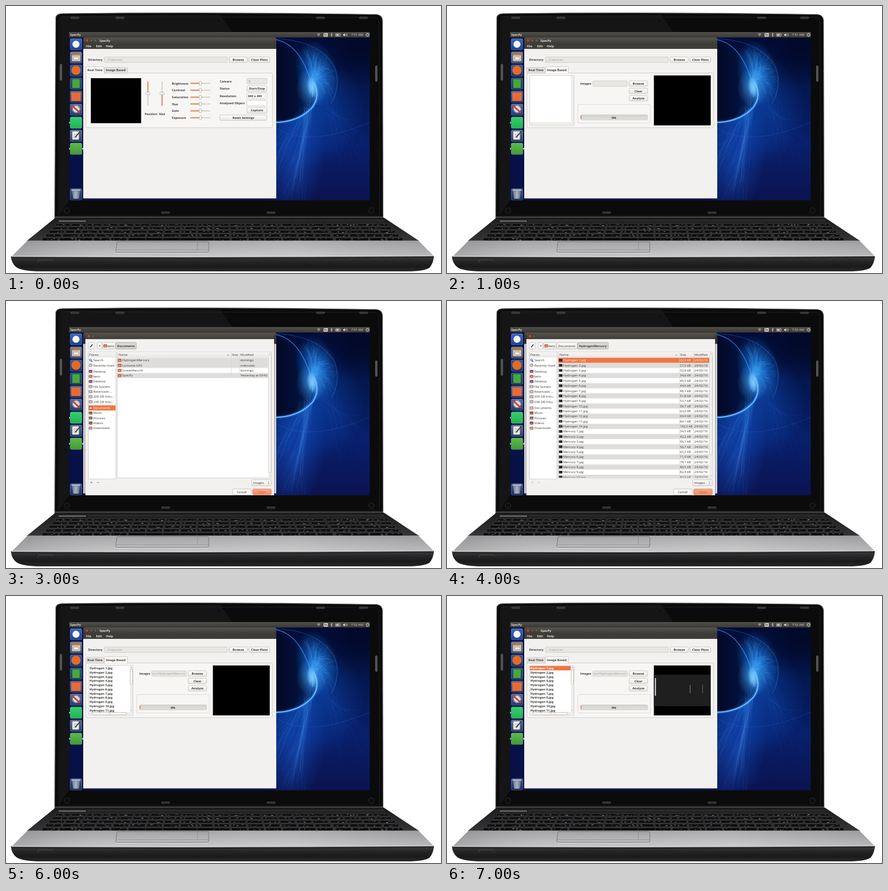
These frames come from a looping animation (800 by 492 pixels, 8 s). An HTML page with a canvas:

```html
<!DOCTYPE html>
<html lang="en">
<head>
<meta charset="utf-8">
<title>Spectrum analysis demo</title>
<style>
html, body { margin: 0; width: 100%; height: 100%; overflow: hidden; background: #fff; }
canvas { display: block; width: 800px; height: 492px; }
</style>
</head>
<body>
<canvas id="stage" width="800" height="492"></canvas>
<script>
const stage = document.getElementById('stage');
let c = stage.getContext('2d');
const ORANGE = '#ee7643', BODY = '#f2f1f0', INK = '#3c3b38', LINE = '#c9c5c0', DIM = '#a3a09b';

let seed = 7;
const rnd = (a = 0, b = 1) => {
  seed = (seed * 16807) % 2147483647;
  return a + (b - a) * seed / 2147483647;
};

// ---------- drawing helpers ----------
function rect(x, y, w, h, fill) { c.fillStyle = fill; c.fillRect(x, y, w, h); }
function box(x, y, w, h, fill, stroke, r = 1.5) {
  c.beginPath();
  c.roundRect(x, y, w, h, r);
  if (fill) { c.fillStyle = fill; c.fill(); }
  if (stroke) { c.strokeStyle = stroke; c.lineWidth = 0.8; c.stroke(); }
}
function dot(x, y, r, fill, stroke) {
  c.beginPath();
  c.arc(x, y, r, 0, 7);
  if (fill) { c.fillStyle = fill; c.fill(); }
  if (stroke) { c.strokeStyle = stroke; c.lineWidth = 0.9; c.stroke(); }
}
function poly(points, fill) {
  c.beginPath();
  points.forEach(([x, y]) => c.lineTo(x, y));
  c.closePath();
  c.fillStyle = fill;
  c.fill();
}
function stroke(d, color, width = 1) {
  c.strokeStyle = color;
  c.lineWidth = width;
  c.stroke(new Path2D(d));
}
function shade(x0, y0, x1, y1, ...colors) {
  const g = c.createLinearGradient(x0, y0, x1, y1);
  colors.forEach((k, i) => g.addColorStop(i / (colors.length - 1), k));
  return g;
}
function glow(x, y, r, color, sx = 1, angle = 0) {
  c.save();
  c.translate(x, y);
  c.rotate(angle);
  c.scale(sx, 1);
  const g = c.createRadialGradient(0, 0, 0, 0, 0, r);
  g.addColorStop(0, `rgba(${color})`);
  g.addColorStop(1, `rgba(${color.replace(/[^,]+$/, '0')})`);
  dot(0, 0, r, g);
  c.restore();
}
function text(s, x, y, color = INK, bold = false, align = 'left') {
  c.font = bold ? 'bold 5.7px "Open Sans", sans-serif' : '5.9px "Open Sans", sans-serif';
  c.textAlign = align;
  c.fillStyle = color;
  c.fillText(s, x, y + 2.1);
}
const label = (s, x, y, color) => text(s, x, y, color, true);
function clipped(x, y, w, h, draw) {
  c.save();
  c.beginPath();
  c.rect(x, y, w, h);
  c.clip();
  draw();
  c.restore();
}
function button(s, x, y, w, h = 10.5) {
  box(x, y, w, h, shade(0, y, 0, y + h, '#fdfdfc', '#e9e7e5'), '#bfbab4', 2);
  text(s, x + w / 2, y + h / 2, INK, true, 'center');
}
function arrow(x, y, up, color = '#5a5855', r = 1.5) {
  const d = up ? -r : r;
  poly([[x - r, y - d / 2], [x + r, y - d / 2], [x, y + d / 2]], color);
}
function titleBar(x, y, w, h) {
  c.beginPath();
  c.roundRect(x, y, w, h, [3, 3, 0, 0]);
  c.fillStyle = shade(0, y, 0, y + 11, '#56544d', '#3d3c37');
  c.fill();
}
function closeButton(x, y) {
  dot(x, y, 2.9, '#e2552f', '#2e2c29');
  stroke(`M${x - 1} ${y - 1}l2 2m0-2l-2 2`, '#4a1c10', 0.7);
}

// ---------- laptop and desktop ----------
function lid() {
  const p = 'M89.5 392L91.5 22Q92 14.5 102 14Q392 10.5 681 15.5Q692 16.5 692.5 27L693.5 392Z';
  c.fillStyle = '#0b0b0c';
  c.fill(new Path2D(p));
  poly([[100, 18], [394, 16], [416, 48], [116, 48], [116, 358], [98, 384]], '#151516');
  stroke(p, '#6c6c6e', 1.2);
  stroke('M97 386L98 27Q98 20 107 20L676 21Q685 21 686 30L687 386Z', '#1f1f21', 1);
  for (const x of [119, 202, 571, 650]) box(x, 20.5, 15, 2.5, '#222', '#666', 1);
  for (const x of [286, 480]) box(x, 379.5, 15, 2.5, '#1b1b1b', '#666', 1);
  box(99.5, 107, 3, 30, '#4a4a4a', '#777');
  box(679.5, 110, 3, 29, '#4a4a4a', '#777');
  dot(391, 28, 3.5, '#070707', '#252528');
  dot(391, 28, 1, '#33343c');
  for (const x of [112, 672]) dot(x, 377, 5, '#0d0d0d', '#333');
  rect(90, 388, 603, 5, shade(0, 388, 0, 393, '#555', '#1a1a1a'));
}
function base() {
  poly([[91, 390], [695, 390], [760, 433], [38, 433]], shade(0, 390, 0, 433, '#1c1c1d', '#353537'));
  rect(97, 395, 50, 2.5, '#6a6a6c');
  rect(150, 394, 545, 3, '#2a2a2c');
  for (let row = 0; row < 5; row++) {
    const y = 401 + row * 6 + row * row * 0.12, h = 4.4 + row * 0.3;
    const left = 100 - (y - 392) * 0.95, right = 694 + (y - 392) * 1.05;
    const step = (right - left) / 21;
    for (let i = 0; i < 21; i++) {
      const x = left + i * step + (i > 16 ? 2 : 0);
      const space = row === 4 && i > 4 && i < 10;
      box(x, y, space ? step : step - 3, h, '#0d0d0e', '#434345', 1);
      if (space) continue;
      for (let k = 0; k < 3; k++) {
        rect(x + rnd(3, step - 9), y + rnd(0.8, h - 1.5), rnd(1.5, 4), rnd(0.6, 1.2), `rgba(215,215,220,${rnd(0.2, 0.65)})`);
      }
    }
  }
  const lip = 'M9 461L787 461Q786 474 779 482Q770 489 738 489L64 489Q32 489 20 482Q10 475 9 461Z';
  c.fillStyle = shade(0, 461, 0, 489, '#3d3d3f', '#262627', '#1a1a1b', '#29292a');
  c.fill(new Path2D(lip));
  const rest = new Path2D('M40 432H758L787 461Q400 464 10 462Z');
  c.fillStyle = shade(0, 432, 0, 463, '#a2a2a4', '#b4b4b6', '#c6c6c8');
  c.fill(rest);
  c.fillStyle = shade(10, 0, 787, 0, 'rgba(90,90,92,.25)', 'rgba(255,255,255,0)', 'rgba(255,255,255,.12)', 'rgba(90,90,92,.1)');
  c.fill(rest);
  stroke('M40 432.5H758', '#77777a', 0.8);
  stroke('M10 461Q400 463 787 460', '#dededf', 1.2);
  stroke('M10 464Q400 467 787 463', '#1b1b1c', 1.2);
  const pad = 'M206 434H370Q373 434 373 437V450Q373 454 369 454H206Q201 454 202 450L204 436Q204 434 206 434Z';
  c.fillStyle = shade(0, 434, 0, 454, '#a4a4a7', '#bdbdbf');
  c.fill(new Path2D(pad));
  stroke(pad, '#757578');
  stroke('M203 449H373M352 434V449', '#88888b', 0.8);
  stroke('M203 455.5H371', '#e3e3e4', 1);
  stroke('M58 473L60 468H85L88 471', '#49494b');
}
function wallpaper() {
  rect(116, 48, 553, 310, shade(0, 48, 0, 358, '#020a32', '#04174f', '#081f6b', '#0b1350'));
  glow(550, 190, 110, '15,90,210,0.6');
  glow(528, 285, 105, '20,85,205,0.5', 0.55, 0.15);
  glow(650, 80, 70, '1,6,32,0.7');

  // dark disc inside the swirl
  const disc = 'M480 64Q540 76 562 142Q572 150 570 168Q548 216 480 214Z';
  c.fillStyle = shade(497, 0, 572, 0, '#020927', '#031038', '#073079');
  c.fill(new Path2D(disc));
  glow(572, 124, 62, '25,125,235,0.8', 0.62, -0.25);
  for (let i = 0; i < 130; i++) {
    const a = rnd(-1.9, 0.6), r = rnd(35, 68);
    stroke(`M${rnd(556, 566)} ${rnd(135, 170)}Q${rnd(552, 585)} ${rnd(85, 140)} ${562 + Math.cos(a) * r * 0.72} ${142 + Math.sin(a) * r}`,
      `rgba(90,190,255,${rnd(0.04, 0.22)})`, 0.7);
  }
  for (let i = 0; i < 90; i++) {
    stroke(`M${rnd(548, 566)} ${rnd(165, 200)}Q${rnd(535, 560)} 265 ${rnd(508, 552)} ${rnd(300, 358)}`,
      `rgba(90,170,255,${rnd(0.02, 0.11)})`, 0.8);
  }
  for (let i = 0; i < 45; i++) {
    stroke(`M${rnd(560, 606)} ${rnd(155, 190)}Q${rnd(590, 640)} ${rnd(170, 230)} ${rnd(590, 669)} ${rnd(210, 300)}`,
      `rgba(50,120,235,${rnd(0.03, 0.16)})`, 0.6);
    stroke(`M497 ${rnd(240, 320)}Q${rnd(510, 540)} ${rnd(210, 270)} ${rnd(540, 560)} ${rnd(180, 210)}`,
      `rgba(80,160,255,${rnd(0.03, 0.16)})`, 0.6);
  }
  stroke('M497 226Q560 262 669 214', 'rgba(70,140,240,.25)', 0.8);
  const rim = 'M480 214Q536 218 564 186Q579 164 566 141';
  stroke(rim, 'rgba(40,140,255,.3)', 6);
  stroke(rim, 'rgba(110,200,255,.55)', 2.5);
  stroke(rim, '#b5e4ff', 0.8);
  glow(563, 150, 20, '190,238,255,0.95', 0.5, -0.2);
  glow(562, 150, 36, '80,180,255,0.6', 0.8);
  stroke('M490 61Q541 66 562 145', 'rgba(80,170,255,.6)', 1.3);
  stroke('M490 60Q575 62 604 112Q617 145 598 180', 'rgba(60,150,255,.35)', 1.2);
}
function launcher() {
  rect(116, 58, 26, 300, 'rgba(8,14,62,.72)');
  const tile = (y, top, bottom) => box(118, y - 10.5, 21.5, 21, shade(0, y - 10, 0, y + 10, top, bottom), 'rgba(255,255,255,.25)', 2.5);
  tile(70.5, '#3d68bd', '#20438e');
  dot(128.7, 70.5, 6.5, '#f4f6fa');
  tile(95, '#6b83ad', '#39517f');
  box(121, 87, 16, 15, '#d9cbb8', '#75604a');
  rect(121, 87, 16, 4, '#b67d4b');
  box(124, 94, 10, 5, '#f3eee7', '#8d8378', 1);
  tile(119, '#3a5a99', '#1c3670');
  dot(128.7, 118.5, 8.5, '#e66b22');
  tile(143, '#2c5575', '#23405a');
  rect(122, 135, 13.5, 16, '#45a83b');
  tile(167, '#426199', '#233a70');
  rect(120, 159, 17.5, 16, '#e86a36');
  tile(191, '#5b6c93', '#263b6d');
  dot(129, 190, 5.5, '#d9d9d9', '#f3f3f3');
  c.setLineDash([2, 1.5]);
  dot(129, 190, 7, null, '#e5e5e5');
  c.setLineDash([]);
  stroke('M122 184L136 197', '#d33a2e', 3);
  tile(215, '#34cf6b', '#22b353');
  tile(239, '#5f6f93', '#2d4069');
  box(122, 231, 12, 15, '#f3f2ee', '#aaa', 1);
  for (let y = 235; y < 244; y += 2.5) rect(124, y, 7, 0.7, '#999');
  stroke('M127 242L137 231', '#42444a', 2);
  tile(263, '#5cba49', '#409b36');
  for (const y of [215, 263]) poly([[116, y - 2], [118, y], [116, y + 2]], '#eee');
  poly([[142, 261], [139.5, 263], [142, 265]], '#eee');
  tile(347, '#42588d', '#1c2e5e');
  poly([[121.5, 340], [136, 340], [134, 355], [123.5, 355]], shade(121, 0, 136, 0, '#66738c', '#a9b3c0', '#5e6b84'));
  box(120.5, 338, 16.5, 2.5, '#cfd6de', '#6b7890', 1);
}
function panel() {
  const light = '#dfdbd2';
  rect(116, 48, 553, 10, shade(0, 48, 0, 58, '#514f49', '#3a3934'));
  label('SpecPy', 118, 53, light);
  poly([[571.5, 51.5], [575, 50], [578.5, 51.5], [575, 56]], '#8b8982');
  box(584, 50, 8, 6.5, light, null, 1);
  c.font = 'bold 5px "Open Sans", sans-serif';
  c.textAlign = 'center';
  c.fillStyle = '#3c3b37';
  c.fillText('En', 588, 55);
  stroke('M597 51.5l3.4 3.2l-1.7 1.6v-6.4l1.7 1.6L597 54.7', light, 0.7);
  box(606, 51, 8.5, 4.6, null, light, 0.5);
  rect(607.2, 52.2, 5, 2.2, light);
  poly([[620, 52], [621.5, 52], [623.5, 50.3], [623.5, 56], [621.5, 54.4], [620, 54.4]], light);
  stroke('M625 51.5q1.2 1.7 0 3.4M626.8 50.5q2 2.7 0 5.4', light, 0.7);
  dot(665, 53.2, 2.2, null, light);
  c.setLineDash([1.1, 1.1]);
  dot(665, 53.2, 3.2, null, light);
  c.setLineDash([]);
}

// ---------- application window ----------
function slider(x, y, from, to, vertical, fillFrom, fillTo) {
  const bar = (a, b, k) => vertical ? box(x - 1, a, 2, b - a, k, null, 1) : box(a, y - 1, b - a, 2, k, null, 1);
  bar(from, to, '#d3d0cb');
  bar(fillFrom, fillTo, '#f0804f');
  if (vertical) box(x - 4, y - 2.2, 8, 4.4, '#fafaf9', '#a9a49e', 2);
  else box(x - 2.2, y - 3.5, 4.4, 7, '#fafaf9', '#a9a49e', 2);
}
function realTime() {
  rect(156, 133, 92.5, 83, '#000');
  slider(261, 161, 139, 184, true, 139, 161);
  slider(287, 161, 139, 184, true, 161, 184);
  label('Position', 255, 199);
  label('Size', 281.5, 199);
  ['Brightness', 'Contrast', 'Saturation', 'Hue', 'Gain', 'Exposure'].forEach((s, i) => {
    const y = 142.5 + i * 12.7;
    label(s, 305, y);
    slider(357.5, y, 339, 376, false, 339, 357);
  });
  ['Camara', 'Status', 'Resolution', 'Analyzed Object'].forEach((s, i) => label(s, 393, 138.7 + i * 13.4));
  box(443, 133.5, 37, 10, '#e9e7e4', LINE);
  label('0', 446, 138.7, DIM);
  button('Start/Stop', 443, 147, 37);
  box(443, 160.5, 37, 10.5, '#fff', '#bfbab4');
  label('680 x 480', 445, 165.7);
  arrow(476.5, 164, true, '#777', 1.2);
  arrow(476.5, 167.5, false, '#777', 1.2);
  box(443, 174, 37, 10, '#fff', '#bfbab4');
  button('Capture', 443, 187, 37);
  button('Reset Settings', 393, 200.8, 87, 10);
}
function spectrum() {
  rect(380.5, 145, 104.5, 58, '#1b1b1c');
  for (let x = 381; x < 485; x += 2) rect(x, 145, 1, 58, 'rgba(70,70,72,.2)');
  rect(382, 152, 2.6, 31, 'rgba(195,185,235,.45)');
  rect(382.7, 151, 1.2, 33, '#fff');
  rect(446.7, 164, 1, 15, '#8d8da0');
  rect(469.6, 163, 1, 16, '#65656f');
}
function imageBased(loaded, selected) {
  box(152, 128, 81.5, 92, '#fff', LINE, 1);
  rect(228, 128.5, 5, 91, '#efedeb');
  rect(152.5, 214, 80, 5.5, '#efedeb');
  if (loaded) {
    if (selected) rect(152.5, 129, 75, 8, ORANGE);
    clipped(152, 128, 76, 86, () => {
      for (let i = 0; i < 11; i++) label(`Hydrogen ${i + 1}.jpg`, 153.5, 133 + i * 7.75, selected && !i ? '#fff' : INK);
    });
    box(228.3, 135, 4.4, 28, '#fafaf9', '#b9b5af', 2);
    box(158, 214.5, 64, 4.4, '#fafaf9', '#b9b5af', 2);
    rect(188, 216.4, 5, 0.6, '#aaa');
    arrow(230.5, 131.5, true, '#777', 1.2);
    arrow(230.5, 211, false, '#777', 1.2);
  }
  label('Images', 245, 143);
  box(268, 138, 63.5, 10, '#e9e7e4', LINE);
  if (loaded) clipped(269, 138, 62, 10, () => text('Documents/HydrogenMercury', 330, 143, DIM, false, 'right'));
  button('Browse', 335, 138, 34, 10);
  button('Clear', 335, 151.5, 34, 10);
  button('Analyze', 335, 165, 34, 10);
  box(240.5, 181.5, 133.5, 34, null, '#d8d5d1', 2);
  box(246, 200.5, 123, 9.5, shade(0, 200, 0, 210, '#d3d0cc', '#e2e0dd'), '#cfcbc6', 2);
  box(245.7, 202, 1.5, 6.5, ORANGE, null, 0.5);
  text('0%', 307, 205.5, INK, true, 'center');
  rect(380.5, 128, 104.5, 92, '#000');
  if (selected) spectrum();
}
function appWindow(state) {
  const byImage = state > 0;
  rect(142, 79, 355, 275.5, BODY);
  titleBar(142, 58, 355, 21);
  rect(142, 354, 355, 0.8, '#8e8b86');
  closeButton(149, 63.5);
  for (const x of [156.8, 164.4]) {
    dot(x, 63.5, 2.6, '#6f6d66', '#2e2c29');
    rect(x - 1, 63.1, 2, 0.8, '#35332f');
  }
  label('SpecPy', 172, 63.7, '#e6e2da');
  ['File', 'Edit', 'Help'].forEach((s, i) => label(s, 147 + i * 18.4, 74, '#e6e2da'));
  label('Directory', 151, 99);
  box(181, 94, 226, 10, '#e9e7e4', LINE);
  text('../Captures', 183.5, 99, DIM);
  button('Browse', 410.5, 94, 33.5, 10);
  button('Clear Plots', 447, 94, 38, 10);

  const tab = (s, x, w, active) => {
    const y = active ? 111.5 : 113;
    box(x, y, w, 124 - y, active ? '#f8f7f6' : '#e3e0dd', LINE, [2, 2, 0, 0]);
    label(s, x + 2.8, 117.8);
  };
  box(147, 123.5, 343, 100.5, '#f7f6f5', LINE, 2);
  tab('Real Time', 147, 33.5, !byImage);
  tab('Image Based', 181, 42.5, byImage);
  if (byImage) {
    rect(181.4, 122.5, 41.7, 2, '#f8f7f6');
    imageBased(state > 5, state === 7);
  } else {
    rect(147.4, 122.5, 32.7, 2, '#f8f7f6');
    realTime();
  }
}

// ---------- file dialog ----------
const PLACES = [
  ['Search', 109, 'lens'], ['Recently Used', 118.5, 'clock'], ['Desktop', 129.5, '#8d3f93'],
  ['beto', 139, '#ea6b39'], ['Desktop', 148.3, '#8d3f93'], ['File System', 157.6, '#b9b8b6'],
  ['Reservado …', 167, '#b9b8b6'], ['209 GB Volu…', 176.3, '#b9b8b6'], ['238 GB Volu…', 185.6, '#b9b8b6'],
  ['Documents', 197, '#e7a98d'], ['Music', 206.2, '#9c4a32'], ['Pictures', 215.5, '#77706c'],
  ['Videos', 224.8, '#7b4d48'], ['Downloads', 234.2, '#d98d6c']
];
const SIZES = '22,9 27,0 32,8 34,6 40,5 44,6 48,1 51,8 53,7 56,7 63,0 69,9 84,1 102,5 34,5 42,2 56,1 56,7 67,2 71,9 76,1 80,5 82,4 84,9'.split(' ');
const FOLDERS = [['HydrogenMercury', 'domingo'], ['Loctome-GPS', 'miércoles'], ['ScreenRecord', 'domingo'], ['SpecPy', 'Yesterday at 09:42']];

function icon(kind, x, y) {
  if (kind === 'lens') {
    dot(x - 0.5, y - 0.5, 2, '#dbe7fa', '#2b4fa0');
    stroke(`M${x + 1} ${y + 1}l2 2`, '#26345c', 1.4);
  } else if (kind === 'clock') {
    dot(x, y, 2.7, '#f3f3f3', '#555');
    stroke(`M${x} ${y - 1.7}v1.7h1.4`, '#444', 0.6);
  } else {
    box(x - 3, y - 2.3, 6, 4.8, kind, 'rgba(60,40,35,.55)', 0.7);
    rect(x - 2, y + 0.2, 4, 1, 'rgba(255,255,255,.55)');
  }
}
function crumb(s, x, w, pressed, house) {
  box(x, 76.5, w, 12, pressed ? '#d9d6d2' : shade(0, 76, 0, 89, '#fbfbfa', '#eae8e5'), pressed ? '#a39e98' : '#c4c0ba', 2);
  if (house) icon(house, x + 5, 82.5);
  text(s, x + (house ? 9 : 2.5), 82.5, INK, pressed);
}
function places(state) {
  box(151.5, 94, 50.5, 234, '#fff', LINE, 0);
  rect(152, 94.5, 49.5, 9.5, shade(0, 94, 0, 104, '#f8f7f6', '#e8e6e3'));
  text('Places', 153, 99.3);
  const active = { 2: 2, 3: 9 }[state];
  PLACES.forEach(([s, y, kind], i) => {
    if (i === active) rect(152, y - 4.7, 49.5, 9.4, state === 3 ? ORANGE : '#dcd9d6');
    icon(kind, 155.7, y);
    text(s, 160.5, y, i === active && state === 3 ? '#fff' : INK);
  });
}
function files(state) {
  const inFolder = state > 3;
  const [sizeX, dateX] = inFolder ? [427, 453] : [414, 429];
  box(204.5, 94, 283.5, 232, '#fff', LINE, 0);
  rect(205, 94.5, 277.5, 9.5, shade(0, 94, 0, 104, '#f8f7f6', '#e8e6e3'));
  text('Name', 207, 99.3);
  rect(483, 94.5, 4.7, 231, '#eeecea');
  box(483.2, 98.5, 4.2, inFolder ? 185 : 218, '#fafaf9', '#bcb8b2', 2);
  arrow(485.4, 96.8, true, '#888', 1);
  arrow(485.4, 322, false, '#888', 1);
  if (state === 2) {
    rect(205, 104, 277.5, 215.5, '#ffe2de');
    rect(205, 320, 283, 5.7, '#dfddda');
    box(211, 320.7, 211, 4.3, '#fafaf9', '#bcb8b2', 2);
    rect(314, 322.6, 5, 0.6, '#aaa');
    poly([[208.5, 321.5], [208.5, 324.3], [206.8, 322.9]], '#888');
    poly([[478.5, 321.5], [478.5, 324.3], [480.2, 322.9]], '#888');
    return;
  }
  text('Size', sizeX + 1.8, 99.3);
  text('Modified', dateX + 2, 99.3);
  arrow(sizeX - 5.5, 99.3, true, '#555');
  const count = inFolder ? SIZES.length : FOLDERS.length;
  clipped(205, 104, 277.5, 221.5, () => {
    for (let i = 0; i < count; i++) {
      const y = 109.2 + i * 9.37;
      const chosen = state === 5 || (state === 4 && i === 0);
      const hovered = state === 3 && i === 0;
      const ink = chosen ? '#fff' : INK;
      if (chosen || hovered || i % 2) rect(205, y - 4.7, 277.5, 9.4, chosen ? ORANGE : '#dedddb');
      if (state === 5) rect(205, y + 4.2, 277.5, 0.6, '#f4a27e');
      if (inFolder) {
        rect(205.8, y - 2.3, 6.4, 4.6, '#1c1a1b');
        rect(207, y - 0.5, i > 8 && i < 14 ? 3.8 : 1, 1.2, '#9b97a6');
        text(i < 14 ? `Hydrogen ${i + 1}.jpg` : `Mercury ${i - 13}.jpg`, 213.8, y, ink);
        text(SIZES[i] + ' kB', sizeX + 1.3, y, ink);
        text('24/02/16', dateX + 1.8, y, ink);
      } else {
        icon('#ea6b39', 209, y);
        text(FOLDERS[i][0], 213.8, y);
        text(FOLDERS[i][1], dateX + 2, y);
      }
    }
  });
  for (const x of [sizeX, dateX]) rect(x, 95, 0.7, inFolder ? 230 : 46.5, state === 5 ? '#f4a27e' : '#d5d2ce');
}
function dialog(state) {
  c.save();
  c.shadowColor = 'rgba(0,0,0,.65)';
  c.shadowBlur = 6;
  rect(146, 62, 347, 295.5, BODY);
  c.restore();
  titleBar(146, 59, 347, 11.5);
  closeButton(152.5, 64.8);
  dot(160, 64.8, 2.6, '#6f6d66', '#2e2c29');
  dot(160, 64.8, 0.9, '#35332f');
  rect(146, 70.5, 347, 287.5, BODY);

  box(151.5, 76.5, 11, 12, '#f8f7f6', '#c4c0ba', 2);
  stroke('M155 85l4-5', '#333', 1.7);
  box(167.5, 76.5, 9, 12, '#f8f7f6', '#c4c0ba', 2);
  poly([[173.2, 81], [173.2, 84], [171, 82.5]], '#444');
  crumb('beto', 177.5, 23.5, false, '#ea6b39');
  if (state === 2) crumb('Desktop', 202.5, 36, true, '#8d3f93');
  else crumb('Documents', 202, 37.5, state === 3);
  if (state > 3) crumb('HydrogenMercury', 240, 56.5, true);

  places(state);
  files(state);
  const sign = state === 3 ? '#8b8883' : '#cbc8c4';
  stroke('M155 334.5h4m-2-2v4M167 334.5h4', sign, 0.9);
  box(452, 329.3, 36, 11.2, shade(0, 329, 0, 341, '#fdfdfc', '#e9e7e5'), '#bfbab4', 2);
  text('Images', 454.5, 334.8);
  arrow(482.8, 333, true, '#555', 1.3);
  arrow(482.8, 336.7, false, '#555', 1.3);
  box(416.5, 346.3, 34.5, 11, '#f8f7f6', '#bfbab4', 2);
  text('Cancel', 433.5, 351.8, INK, false, 'center');
  box(453.7, 346.3, 34.3, 11, shade(0, 346, 0, 357, '#f8a684', '#f18e69'), '#d98563', 2);
  text('Open', 470.8, 351.8, '#b5623f', false, 'center');
}

// ---------- playback ----------
const backdrop = document.createElement('canvas');
backdrop.width = 800;
backdrop.height = 492;
const screen = c;
c = backdrop.getContext('2d');
rect(0, 0, 800, 492, '#fff');
lid();
base();
clipped(116, 48, 553, 310, () => { wallpaper(); launcher(); panel(); });
c = screen;

function draw(state) {
  c.drawImage(backdrop, 0, 0);
  text(state < 4 ? '7:51 AM' : '7:52 AM', 634.5, 53, '#dfdbd2');
  clipped(116, 58, 553, 300, () => {
    appWindow(state);
    if (state > 1 && state < 6) dialog(state);
  });
}

let shown = -1;
function tick() {
  const state = Math.floor(performance.now() / 1000) % 8;
  if (state !== shown) draw(shown = state);
  requestAnimationFrame(tick);
}
tick();
</script>
</body>
</html>
```
